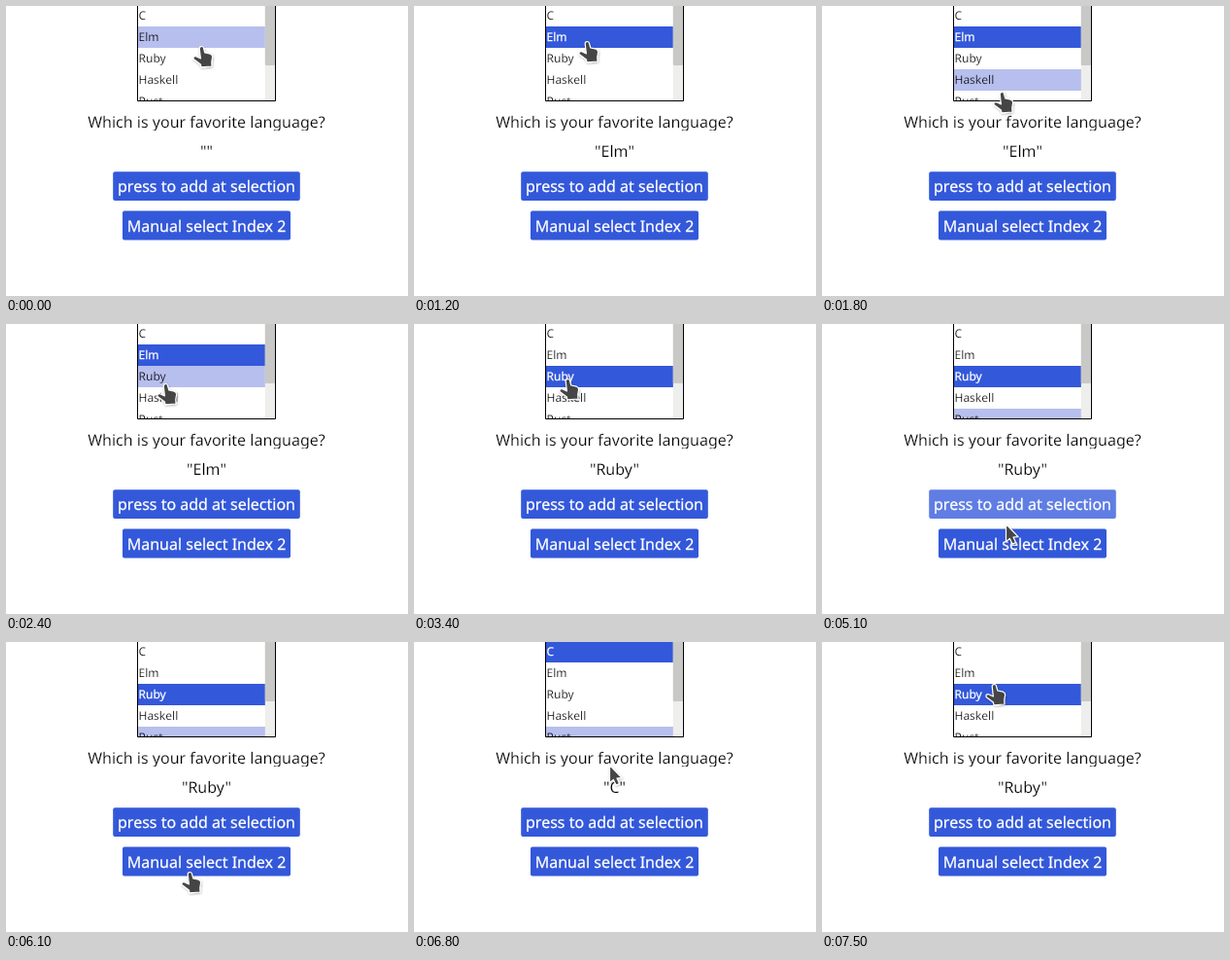
These frames come from a looping animation (414x298 px, 8 s). An HTML page:

```html
<!DOCTYPE html>
<html lang="en">
<head>
<meta charset="utf-8">
<title>Selection list</title>
<style>
  html, body { margin: 0; width: 100%; height: 100%; overflow: hidden; background: #fff; }
  svg { display: block; width: 100%; height: 100%; }
  text {
    font-family: "Noto Sans", sans-serif; font-size: 16px; white-space: pre;
    text-rendering: geometricPrecision; stroke: #fff; stroke-width: 0.25px;
  }
  .mid { text-anchor: middle; }
  .label { fill: #fff; }
  #rows text { font-size: 12px; }
</style>
</head>
<body>
<svg viewBox="0 0 414 298">
  <defs>
    <clipPath id="listClip"><rect x="136" y="0" width="141" height="97"/></clipPath>
    <clipPath id="askClip"><rect x="0" y="104" width="414" height="24"/></clipPath>
    <filter id="soft" x="-50%" y="-50%" width="200%" height="200%">
      <feDropShadow dx="0.5" dy="1" stdDeviation="0.9" flood-color="#000" flood-opacity="0.3"/>
    </filter>
  </defs>
  <rect width="414" height="298" fill="#fff"/>
  <g clip-path="url(#listClip)">
    <g id="rows"></g>
    <rect x="266.8" y="0" width="10.2" height="97" fill="#eeeeec"/>
    <rect x="266.8" y="-4" width="10.2" height="65" rx="1" fill="#c8c8c6"/>
  </g>
  <path d="M135.5 0V97.5H277.5V0" fill="none" stroke="#000"/>
  <text class="mid" x="206.5" y="125" clip-path="url(#askClip)">Which is your favorite language?</text>
  <text class="mid" x="206.5" y="155" id="answer"></text>
  <rect id="add" x="110.2" y="170.2" width="192.6" height="29.8" rx="2"/>
  <text class="mid label" x="206.5" y="191">press to add at selection</text>
  <rect id="manual" x="120" y="210.6" width="173" height="30" rx="2"/>
  <text class="mid label" x="206.5" y="232">Manual select Index 2</text>
  <g id="cursor" fill="#454545" stroke="#fff" stroke-width="1.2" stroke-linejoin="round" filter="url(#soft)">
    <path id="hand" d="M-2.8 1.5C-3 -.8 .8 -1.2 1.4 .8L2.8 6L8.4 7.2Q10.8 8 10.6 10.6L9.8 15.4L10 20L-1 20.8L-1.6 18L-8.6 12.8C-9.8 11.2 -8.4 9.2 -6.4 9.8L-1.6 12Z"/>
    <path id="arrow" d="M-.5 -.5V17.6L3.4 14.4L6.2 20.2L9.6 18.4L7 13L12 12.6Z"/>
  </g>
</svg>
<script>
  const LOOP = 8000, STEP = 100, LAG = 70, PRESS = 6100;
  const BLUE = "#3358da", LIT = "#5f7de3", PALE = "#b7bfee";
  const NAMES = ["C", "Elm", "Ruby", "Haskell", "Rust"];
  const ROW = 22, LIST_END = 97;
  const BUTTONS = { add: 170, manual: 211 }, BUTTON_H = 30;
  const $ = id => document.getElementById(id);

  // Pointer moves; power 1 passes through its end, 2 slows to a stop
  const HOME = { x: 202, y: 42 };
  const MOVES = [
    { start: 600, steps: 2, x: 179, y: 37, power: 2 },
    { start: 1600, steps: 3, x: 186, y: 89, power: 1 },
    { start: 1900, steps: 2, x: 185, y: 90, power: 2 },
    { start: 2200, steps: 3, x: 165, y: 62, power: 2 },
    { start: 2600, steps: 1, x: 159, y: 57, power: 1 },
    { start: 4100, steps: 5, x: 187, y: 177, power: 2 },
    { start: 4900, steps: 3, x: 190, y: 206, power: 1 },
    { start: 5200, steps: 2, x: 190, y: 238, power: 2 },
    { start: 5600, steps: 1, x: 190, y: 237, power: 1 },
    { start: 6500, steps: 4, x: 202, y: 127, power: 1 },
    { start: 6900, steps: 4, x: 178, y: 44, power: 2 }
  ];
  const PICKS = [
    { time: 0, row: -1 }, { time: 1200, row: 1 }, { time: 3400, row: 2 },
    { time: PRESS + STEP, row: 0 }, { time: 7500, row: 2 }
  ];

  function pointer(t) {
    let { x, y } = HOME;
    for (const m of MOVES) {
      const p = Math.min(1, (t - m.start + STEP) / (m.steps * STEP));
      if (p <= 0) break;
      const e = 1 - (1 - p) ** m.power;
      x += (m.x - x) * e;
      y += (m.y - y) * e;
    }
    return { x, y };
  }

  const buttonAt = y => Object.keys(BUTTONS).find(id => y >= BUTTONS[id] && y < BUTTONS[id] + BUTTON_H);
  // Below the list the last row stays lit
  const rowAt = y => Math.min(NAMES.length - 1, Math.floor((y + 1) / ROW));

  function make(tag, attrs) {
    const el = document.createElementNS("http://www.w3.org/2000/svg", tag);
    for (const key in attrs) el.setAttribute(key, attrs[key]);
    return $("rows").appendChild(el);
  }

  const rows = NAMES.map((name, i) => {
    const y = i * ROW - 1;
    const bar = make("rect", { x: 136, y, width: 131, height: ROW });
    const text = make("text", { x: 136.5, y: y + 15 });
    text.textContent = name;
    return { bar, text };
  });

  function draw(time) {
    const t = Math.floor(time / STEP) * STEP;
    const { x, y } = pointer(t);
    const seen = pointer(t - LAG).y; // hover trails the pointer
    const hover = rowAt(seen);
    const chosen = PICKS.findLast(p => p.time <= t).row;

    rows.forEach(({ bar, text }, i) => {
      const on = i === chosen;
      const fill = on ? BLUE : i === hover ? PALE : "#fff";
      bar.setAttribute("fill", fill);
      text.setAttribute("fill", on ? "#fff" : "#000");
      text.style.stroke = on ? "#fff" : fill;
    });
    $("answer").textContent = `"${NAMES[chosen] ?? ""}"`;

    const lit = t === PRESS ? null : buttonAt(seen);
    for (const id in BUTTONS) $(id).setAttribute("fill", id === lit ? LIT : BLUE);

    const arrow = y > LIST_END && !buttonAt(y);
    $("cursor").setAttribute("transform", `translate(${x} ${y})`);
    $("arrow").style.display = arrow ? "" : "none";
    $("hand").style.display = arrow ? "none" : "";
  }

  const start = performance.now();
  function tick() {
    draw((performance.now() - start) % LOOP);
    requestAnimationFrame(tick);
  }
  tick();
</script>
</body>
</html>
```
